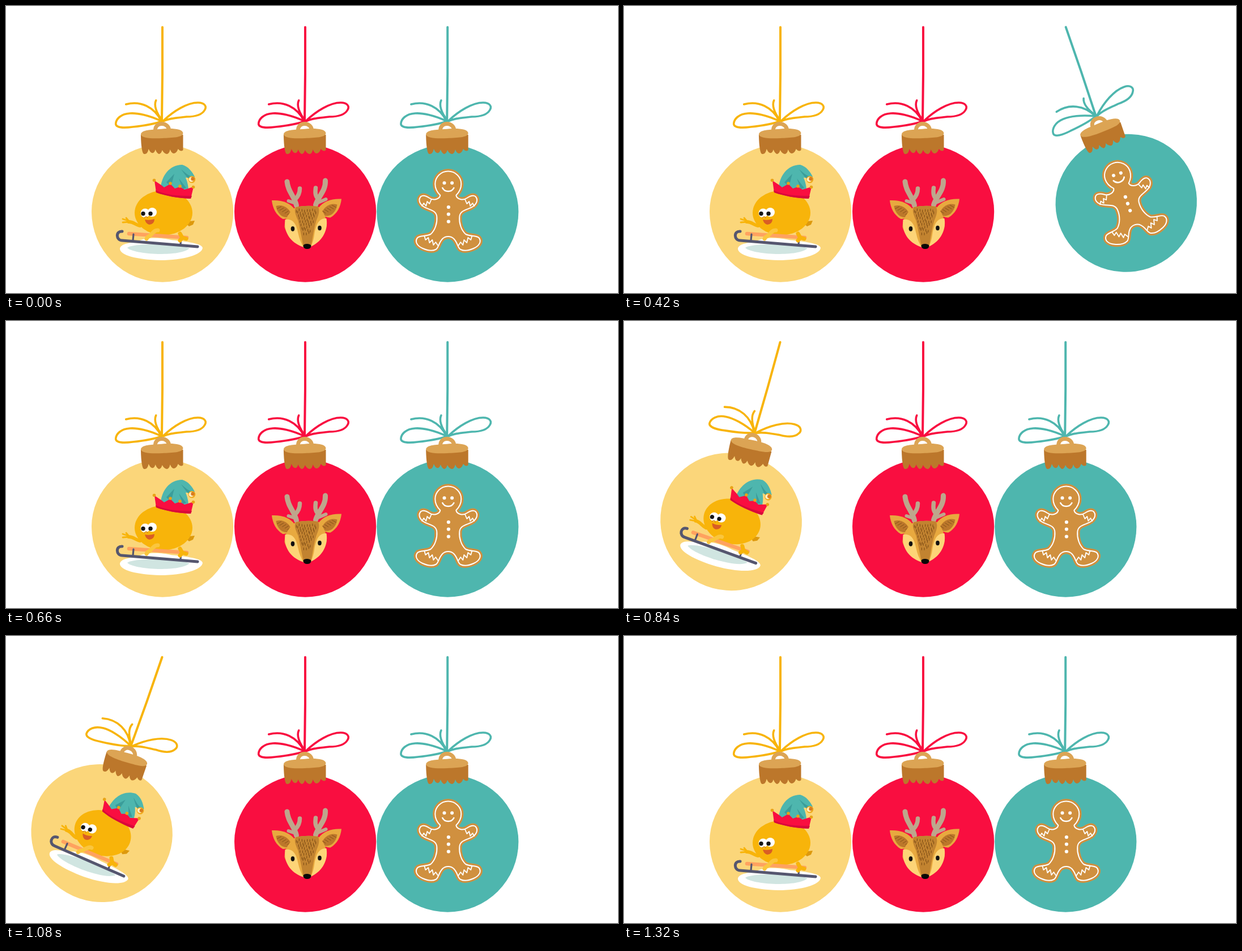
These frames come from a looping animation (1080 px wide and 508 px high, 1.35 s). An HTML page with a canvas:

```html
<!DOCTYPE html>
<html lang="en">
<head>
<meta charset="utf-8">
<title>Swinging baubles</title>
<style>
html, body { margin: 0; width: 100%; height: 100%; overflow: hidden; background: #fff; }
canvas { display: block; width: 1080px; height: 508px; }
</style>
</head>
<body>
<canvas id="stage" width="1080" height="508"></canvas>
<script>
const ctx = document.getElementById('stage').getContext('2d');
const LOOP = 1350, STEP = 30, TOP = 36;
const GOLD = '#f8b40a', RED = '#f90e40', TEAL = '#4eb6ae', TAN = '#dca454', BROWN = '#bc772b';

function fill(d, color) {
  ctx.fillStyle = color;
  ctx.fill(typeof d === 'string' ? new Path2D(d) : d);
}

function line(d, color, width) {
  ctx.strokeStyle = color;
  ctx.lineWidth = width;
  ctx.stroke(typeof d === 'string' ? new Path2D(d) : d);
}

function oval(x, y, rx, ry, color, turn = 0) {
  ctx.beginPath();
  ctx.ellipse(x, y, rx, ry, turn, 0, Math.PI * 2);
  ctx.fillStyle = color;
  ctx.fill();
}

const dot = (x, y, r, color) => oval(x, y, r, r, color);

// Repeats a half shape on the other side of x = 0
function mirror(d) {
  const half = new Path2D(d), whole = new Path2D(d);
  whole.addPath(half, new DOMMatrix([-1, 0, 0, 1, 0, 0]));
  return whole;
}

// String, bow, cap and ball around x = 0
function bauble(ball, thread) {
  // slightly flattened towards the cap
  ctx.beginPath();
  ctx.ellipse(.4, 364, 125.1, 118.5, 0, Math.PI, 0);
  ctx.ellipse(.4, 364, 125.1, 124.7, 0, 0, Math.PI);
  ctx.fillStyle = ball;
  ctx.fill();
  line('M.3 37.5V120L-.7 203', thread, 4);
  line('M-1 204C-24 193-45 189-57 190C-73 191-82 200-82 209C-81 216-66 216-52 214C-33 212-14 209-1 204', thread, 3.6);
  line('M2 203C20 186 44 171 63 171C75 171 79 178 75 184C70 193 57 196 43 196C28 198 13 198 2 204', thread, 3.6);
  line('M-64 174C-38 167-14 179-2 203M-11 167C-16 178-8 192 0 203', thread, 3.6);
  line('M-12 222C-15 204 13 204 12 222', TAN, 7);
  fill('M-37.8 228H36.8V255Q33 259 28 253Q25 261 20 261Q16 260 14 254Q12 262 8 262Q3 261 0 255Q-2 262-6 262Q-10 260-12 254Q-14 261-18 260Q-21 260-24 253Q-26 263-32 262Q-37 261-37.8 228Z', BROWN);
  fill('M-37.8 227C-36 219-19 219-6 218C13 216 36 216 36.8 225C36 233 18 233 0 234C-19 235-37 234-37.8 227Z', TAN);
}

function sled() {
  fill('M201 429C204 419 222 420 236 415C250 409 276 410 291 414C308 416 346 419 347 428C346 440 314 450 272 450C231 449 200 441 201 429Z', '#fff');
  fill('M214 428C224 419 303 420 324 429C313 438 288 439 268 439C242 438 220 434 214 428Z', '#d0e5e1');
  fill('M314 382L333 380L330 387L323 390Z', '#dd990d');
  oval(278, 366, 51, 39.5, GOLD);
  line('M237 389C228 388 225 381 216 382', GOLD, 6);
  line('M218 381L206 377M218 382L206 383M218 382L212 375', GOLD, 2.8);
  line('M217 403L319 410', '#ffa25f', 6.5);
  line('M225 404L224 415M309 411L308 422', '#55566f', 3.2);
  line('M205 399C193 398 194 415 205 415L338 426', '#55566f', 5);
  line('M307 403L311 410L307 415M311 410L318 412', GOLD, 7);
  line('M268 397C261 396 258 405 250 409L248 412', '#fac63e', 7);
  dot(245.5, 366.5, 8, '#fff');
  dot(258, 365, 8, '#fff');
  dot(242, 367.5, 3.7, '#161616');
  dot(255, 367.5, 3.7, '#161616');
  line('M244 375Q248 371 250 375', '#d98b0b', 1.5);
  fill('M245 378Q253 380 262 377Q262 386 253 387Q247 386 245 378Z', '#d95d24');
  elfHat();
}

function elfHat() {
  fill('M273 321C275 301 288 281 311 281C322 284 329 294 333 302L326 307C322 304 319 303 317 304C320 311 322 318 322 328Z', TEAL);
  fill('M309 289C315 293 322 303 333 302L326 307C321 306 316 299 309 289M283 312L297 297L291 320ZM305 305L318 322L312 324Z', '#3b9d9a');
  fill('M262 309L274 317L279 321L290 315L298 323L307 320L315 325L331 320L326 341C303 340 281 336 265 330Z', RED);
  fill('M264 326C282 335 304 336 328 336L326 341C303 340 281 336 265 330Z', '#d90a3a');
  for (const [x, y] of [[261.5, 308.5], [290, 314], [307, 319], [330.5, 320.5]]) dot(x, y, 2.8, '#e9a317');
  dot(328, 307, 6.3, '#f0a91d');
  dot(327, 307, 4.3, '#fff0c4');
  dot(329.5, 306, 3.2, '#d97c20');
}

function ear() {
  fill('M-61.5 344C-44 343-29 348-21 360C-22 372-33 377-42 377C-54 370-60 358-61.5 344Z', '#e8a93f');
  fill('M-54 354C-42 350-30 358-27 369C-30 377-42 374-46 370C-51 365-53 360-54 354Z', '#bc772b');
  for (let i = 0; i < 5; i++) {
    const x = -52 + i * 4.6, y = 359 + i * 2.6;
    line(`M${x} ${y}l${7 - i * .3} -4`, '#855317', 1);
  }
}

function deer() {
  ctx.save();
  ctx.translate(530.5, 0);
  const horn = '#bea68c';
  line('M-18 353C-21 337-33 329-34.5 311', horn, 9);
  line('M-20 342C-15 337-12 331-12 323', horn, 7.5);
  line('M-20 349L-32 345', horn, 6);
  line('M16 352C21 336 34 327 33 309', horn, 9);
  line('M20 341C15 336 15 330 16 322', horn, 7.5);
  line('M20 348L34 342', horn, 6);
  ear();
  ctx.save();
  ctx.translate(0, -2.5);
  ctx.scale(-1, 1);
  ear();
  ctx.restore();
  fill('M-19 356Q0 352 20 355C31 363 36 378 35 390C32 408 16 423 1 429C-16 424-35 408-39 391C-39 377-30 363-19 356Z', '#e8a93f');
  fill('M-38 378C-23 376-18 387-15 402Q-12 417-5 427C-24 421-41 405-38 378Z', '#fdd477');
  fill('M35 376C22 375 17 386 14 402Q12 418 7 426C24 419 39 400 35 376Z', '#fdd477');
  fill('M-19 356Q0 352 20 355C24 361 21 371 17 380C13 393 11 408 8 424H-6C-9 408-12 393-15 380C-19 371-23 362-19 356Z', '#c28330');
  let seed = 7;
  const rnd = () => (seed = seed * 16807 % 2147483647) / 2147483647;
  for (let row = 0; row < 9; row++) {
    const reach = 18 - row * 1.5;
    for (let x = -reach; x <= reach; x += 4.6) {
      line(`M${x + rnd()} ${358 + row * 5 + rnd() * 4}v3.6`, '#7e4d16', 1.1);
    }
  }
  oval(-24.5, 394.3, 3.3, 4.4, '#111');
  oval(23, 393, 3.3, 4.2, '#111');
  fill('M-6 424C-5 420 6 420 8 424C8 429 4 430 1 430C-3 430-6 428-6 424Z', '#080808');
  ctx.restore();
}

function gingerbread() {
  ctx.save();
  ctx.translate(780.3, 0);
  const dough = '#d0903f';
  const body = mirror('M0 292.5C13 292.5 23 303 23 315C23 324 19 330 14 335C15 342 26 345 33 340C39 336 44 334 48 337C53 342 51 349 45 354C36 361 21 360 20 373C19 384 23 397 31 404C39 408 50 406 54 410C60 417 54 425 45 429C36 433 28 434 22 431C17 429 17 419 10 412C7 409 3 408 0 408');
  line(body, dough, 8.4);
  fill(body, dough);
  line('M0 295V406', dough, 3);
  line(body, '#fff', 2);
  line(mirror('M30 343L33 350L37 346L39 354L43 349L46 354M42 407L40 414L35 410L33 419L28 414L26 423L22 418L18 424'), '#fff', 1.8);
  dot(-6.8, 313.3, 3, '#fff');
  dot(6.8, 313.3, 3, '#fff');
  line('M-10 322C-6 330 6 330 10 322', '#fff', 2.6);
  for (const y of [356, 368.5, 381.5]) dot(.6, y, 3.1, '#fff');
  ctx.restore();
}

// Bezier ease-out (0, 0, .58, 1), solved by halving
function easeOut(x) {
  let lo = 0, hi = 1;
  for (let i = 0; i < 24; i++) {
    const t = (lo + hi) / 2;
    if (1.74 * (1 - t) * t * t + t * t * t < x) lo = t; else hi = t;
  }
  return 3 * (1 - lo) * lo * lo + lo * lo * lo;
}

// Angle of one swing out and back
function swing(t) {
  const peak = 334, end = 660;
  if (t <= 0 || t >= end) return 0;
  const part = t < peak ? t / peak : (end - t) / (end - peak);
  return easeOut(part) * 21.15 * Math.PI / 180;
}

function hang(x, angle, ball, thread, art) {
  ctx.save();
  ctx.translate(x, TOP);
  ctx.rotate(angle);
  ctx.translate(0, -TOP);
  bauble(ball, thread);
  ctx.translate(-x, 0);
  art();
  ctx.restore();
}

function draw(now) {
  const t = Math.floor(now % LOOP / STEP) * STEP;
  ctx.fillStyle = '#fff';
  ctx.fillRect(0, 0, 1080, 508);
  ctx.lineCap = ctx.lineJoin = 'round';
  hang(275.7, swing(t - 660), '#fbd67a', GOLD, sled);
  hang(527.7, 0, RED, RED, deer);
  hang(778.9, -swing(t), TEAL, TEAL, gingerbread);
}

const start = performance.now();
function tick() {
  draw(performance.now() - start);
  requestAnimationFrame(tick);
}
tick();
</script>
</body>
</html>
```
